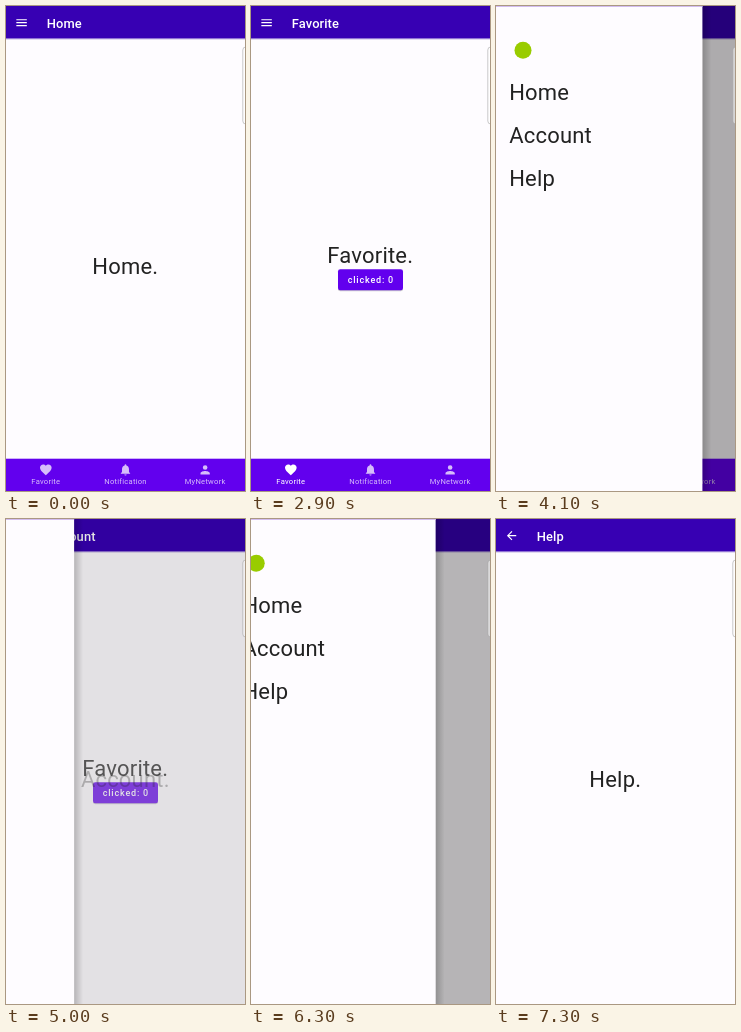
Write an HTML page that moves like this. It is 239 px wide and 485 px high and loops after 8 s.

```html
<!DOCTYPE html>
<html lang="en">
<head>
<meta charset="utf-8">
<title>Navigation demo</title>
<style>
  html, body { margin: 0; width: 100%; height: 100%; overflow: hidden; background: #fefcff; }
  #stage { display: block; width: 100vw; height: 100vh; }
  text { font-family: Roboto, "Open Sans", sans-serif; }
  .big { font-size: 22px; letter-spacing: .2px; fill: #222; }
  .mid { text-anchor: middle; }
  .title { font-size: 12.9px; font-weight: 500; letter-spacing: .1px; fill: #fff; }
  .label { font-size: 7.6px; letter-spacing: .25px; text-anchor: middle; }
  .button { font-size: 9px; font-weight: 500; letter-spacing: .8px; fill: #fff; }
  #nav { fill: #fff; }
</style>
</head>
<body>
<svg id="stage" viewBox="0 0 239 485">
  <defs>
    <linearGradient id="shade">
      <stop offset="0" stop-opacity=".2"/>
      <stop offset="1" stop-opacity="0"/>
    </linearGradient>
  </defs>
  <rect width="239" height="485" fill="#fefcff"/>
  <g id="pages"></g>

  <rect y="32.6" width="239" height="1" fill="#cfc3e6"/>
  <svg width="239" height="32.6">
    <rect width="239" height="33" fill="#3700b3"/>
    <circle id="tap" cx="15.6" cy="16.7" r="14" fill="#fff"/>
    <g transform="translate(8.6 9.7) scale(.582)" fill="none" stroke="#fff" stroke-width="2">
      <path id="menu" d="M3 7h18M3 12h18M3 17h18"/>
      <path id="back" d="M20 12H5.5M12.7 4.7L5.4 12l7.3 7.3"/>
    </g>
    <text id="title" class="title" x="40.8" y="21.5"></text>
  </svg>

  <svg id="nav" y="452.4" width="239" height="32.6">
    <rect width="239" height="33" fill="#6200ee"/>
    <circle id="ripple" cy="16.3"/>
  </svg>

  <rect id="scrim" width="239" height="485"/>
  <g id="drawer">
    <rect x="206.4" width="9" height="485" fill="url(#shade)"/>
    <rect width="206.4" height="485" fill="#fefcff"/>
    <rect width="206.4" height="1" fill="#d2bdf0"/>
    <circle cx="27" cy="44.3" r="8.5" fill="#9c0"/>
    <text class="big" x="13.2" y="93.7">Home</text>
    <text class="big" x="13.2" y="136.7">Account</text>
    <text class="big" x="13.2" y="179.7">Help</text>
  </g>
  <rect x="236.8" y="41" width="8" height="77" rx="3" fill="#fff" fill-opacity=".5"
        stroke="#a0a0a0" stroke-opacity=".7" stroke-width=".8"/>
</svg>

<script>
const LOOP = 8000, STEP = 100, DRAWER = 206.4;
const $ = id => document.getElementById(id);
const clamp = x => Math.min(1, Math.max(0, x));

// cubic-bezier(.4, 0, .2, 1)
function ease(x) {
  let lo = 0, hi = 1, u = .5;
  for (let i = 0; i < 20; i++) {
    u = (lo + hi) / 2;
    const bx = 1.2 * u * (1 - u) ** 2 + .6 * u * u * (1 - u) + u ** 3;
    if (bx < x) lo = u; else hi = u;
  }
  return x <= 0 ? 0 : x >= 1 ? 1 : u * u * (3 - 2 * u);
}
const tween = (t, start, length) => ease(clamp((t - start) / length));

const tabs = [
  ["Favorite", "M12 21.3L10.5 20C5.4 15.4 2 12.3 2 8.5 2 5.4 4.4 3 7.5 3c1.7 0 3.4.8 4.5 2.1C13.1 3.8 14.8 3 16.5 3 19.6 3 22 5.4 22 8.5c0 3.8-3.4 6.9-8.5 11.5z"],
  ["Notification", "M10 20h4a2 2 0 0 1-4 0zM18 16v-5c0-3-1.6-5.6-4.5-6.3V4a1.5 1.5 0 0 0-3 0v.7C7.6 5.4 6 7.9 6 11v5l-2 2v1h16v-1z"],
  ["MyNetwork", "M8 8a4 4 0 0 1 8 0a4 4 0 0 1-8 0zM12 14c-2.7 0-8 1.3-8 4v2h16v-2c0-2.7-5.3-4-8-4z"]
];
const tabX = i => 239 * (2 * i + 1) / 6;

const visits = [
  { page: "Home", at: -LOOP },
  { page: "Notification", at: 475 },
  { page: "MyNetwork", at: 1530 },
  { page: "Favorite", at: 2430 },
  { page: "Account", at: 4920 },
  { page: "Help", at: 6920 }
];
const presses = [{ tab: 1, at: 415 }, { tab: 2, at: 1470 }, { tab: 0, at: 2370 }];
const drawerMoves = [{ open: 3740, close: 4890 }, { open: 6140, close: 6890 }];

$("pages").innerHTML = visits.map(({ page }) => {
  const fav = page === "Favorite";
  return `<g id="${page}"><text class="big mid" x="119.3" y="${fav ? 257 : 267.8}">${page}.</text>` +
    (fav ? `<rect x="87" y="264" width="65" height="21.3" rx="2.3" fill="#000" opacity=".2"/>
      <rect x="87" y="263.3" width="65" height="21" rx="2.3" fill="#6200ee"/>
      <text class="button mid" x="119.9" y="277.2">clicked: 0</text>` : "") + "</g>";
}).join("");

$("nav").insertAdjacentHTML("beforeend", tabs.map(([name, icon], i) =>
  `<g id="tab${i}"><path d="${icon}" transform="translate(${tabX(i) - 7} 4.4) scale(.582)"/>
   <text class="label" x="${tabX(i)}" y="25.4">${name}</text></g>`).join(""));

function draw(t) {
  const now = visits.findLastIndex(v => t >= v.at);
  const fade = tween(t, visits[now].at, 300);
  const shown = visits.map((v, i) => i === now ? fade : i === now - 1 ? 1 - fade : 0);
  visits.forEach((v, i) => $(v.page).setAttribute("opacity", shown[i]));

  const page = visits[now].page;
  $("title").textContent = page;
  $("back").style.display = page === "Help" ? "" : "none";
  $("menu").style.display = page === "Help" ? "none" : "";
  $("nav").style.display = now < 4 ? "" : "none";
  tabs.forEach(([name], i) => {
    const chosen = shown[visits.findIndex(v => v.page === name)];
    $("tab" + i).setAttribute("opacity", .74 + .26 * chosen);
  });

  const press = presses.findLast(p => t >= p.at);
  const age = press ? t - press.at : LOOP;
  $("ripple").setAttribute("cx", tabX(press ? press.tab : 0));
  $("ripple").setAttribute("r", 24 + 19 * tween(age, 0, 225));
  $("ripple").setAttribute("opacity", .2 * clamp(age / 75) * clamp((480 - age) / 120));

  let open = 0, tap = 0;
  for (const m of drawerMoves) {
    open += tween(t, m.open, 256) - tween(t, m.close, 256);
    tap += clamp((t - m.open + 90) / 75) * clamp((m.open + 200 - t) / 150);
  }
  $("tap").setAttribute("opacity", .2 * tap);
  $("scrim").setAttribute("opacity", .32 * open);
  $("drawer").setAttribute("transform", `translate(${DRAWER * (open - 1)} 0)`);
  $("drawer").style.display = open > 0 ? "" : "none";
}

const begin = performance.now();
function tick() {
  const t = (performance.now() - begin) % LOOP;
  draw(Math.floor(t / STEP) * STEP);
  requestAnimationFrame(tick);
}
tick();
</script>
</body>
</html>
```
